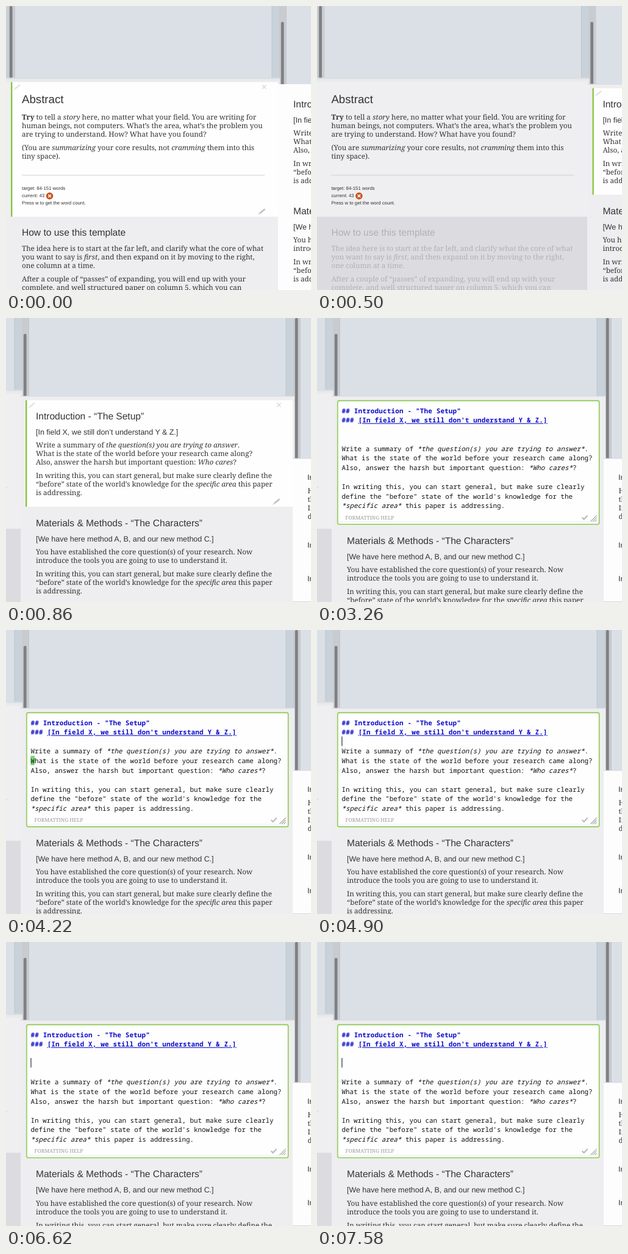
Animation of 500 by 465 pixels, one loop 8000 ms. Source, as an HTML page:

```html
<!DOCTYPE html>
<html lang="en">
<head>
<meta charset="utf-8">
<title>Column editor</title>
<style>
  html, body { margin: 0; width: 100%; height: 100%; overflow: hidden; background: #dbe0e7; }
  svg { display: block; width: 500px; height: 465px; }
  text { white-space: pre; text-rendering: geometricPrecision; }
  .h1, .h2, .h3, .small { font-family: "Liberation Sans", Arial, sans-serif; }
  .h1 { font-size: 18.67px; }
  .h2 { font-size: 15.56px; }
  .h3 { font-size: 12.44px; }
  .small { font-size: 7.78px; }
  .body, .help { font-family: "Noto Serif", serif; }
  .body { font-size: 11.67px; }
  .help { font-size: 8.4px; fill: #999; }
  .code { font-family: "Noto Sans Mono", monospace; font-size: 10.89px; fill: #111; }
  .title { font-weight: bold; fill: #0c0cc8; letter-spacing: .22px; }
  .i { font-style: italic; }
  .b { font-weight: bold; }
  .u { text-decoration: underline; }
</style>
</head>
<body>
<svg id="stage" viewBox="0 0 500 465" xmlns="http://www.w3.org/2000/svg"></svg>
<script>
const LOOP = 8000;
const LINE = 14;      // rendered text
const ROW = 15.56;    // editor text
const PITCH = 445;    // distance between columns
const SCROLL = 422;

const rect = (x, y, w, h, fill, more = '') =>
  `<rect x="${x}" y="${y}" width="${w}" height="${h}" fill="${fill}" ${more}/>`;

const path = (d, stroke, width, more = '') =>
  `<path d="${d}" fill="none" stroke="${stroke}" stroke-width="${width}" ${more}/>`;

const group = (id, ...parts) => `<g id="${id}">${parts.join('')}</g>`;

// _italic_, ~bold~, |underlined|
const mark = s => s
  .replace(/&/g, '&amp;')
  .replace(/_(.+?)_/g, '<tspan class="i">$1</tspan>')
  .replace(/~(.+?)~/g, '<tspan class="b">$1</tspan>')
  .replace(/\|(.+?)\|/g, '<tspan class="u">$1</tspan>');

const text = (cls, x, y, s) => `<text class="${cls}" x="${x}" y="${y}">${mark(s)}</text>`;
const lines = (cls, x, y, step, list) =>
  list.map((s, i) => text(cls, x, y + i * step, s)).join('');

const pencil = (x, y, color) => `<g transform="translate(${x} ${y})">` +
  path('M-3.4 2.8 5 -4', color, 2.4) + path('M-5.8 4.7 -3.6 2.9', color, 1.2) + '</g>';
const cross = (x, y, r, color, w) =>
  path(`M${x - r} ${y - r}l${2 * r} ${2 * r}m0 ${-2 * r}l${-2 * r} ${2 * r}`, color, w);

function backdrop(k, thumbTop, thumbEnd) {
  return `<g transform="translate(${k * PITCH} 0)">` +
    rect(26, 0, 11.5, 465, '#c9cbce') +
    rect(28.8, thumbTop, 4.8, thumbEnd - thumbTop, '#7f8083', 'rx="2.2"') +
    rect(37, 0, 422, 465, '#dbe0e7') + rect(37, 0, 1, 465, '#c3c9d2') +
    rect(459, 0, 13, 465, '#c9d2da') + rect(458.5, 0, 1, 465, '#bcc4ce') + '</g>';
}

function selected(x, y, h) {
  return rect(x, y, 438, h, '#fefefe') + rect(x, y, 2.4, h, '#8bc53f') +
    pencil(x + 10, y + 8.5, '#e3e3e3') + cross(x + 415.3, y + 8, 3.2, '#d8d8d8', 1.3) +
    pencil(x + 411.5, y + h - 8.5, '#bdbdbd');
}

const columnOne = `<g transform="translate(${-SCROLL} 0)">` +
  rect(0, 118, 449, 347, '#e9eaec') + rect(0, 117.5, 449, 2, '#dcdee2') +
  rect(0, 124, 446, 221, '#efeff1') +
  group('parts', rect(0, 345, 446, 120, 'inherit')) +
  group('abstract', selected(8, 124.5, 220.5)) +
  text('h1', 26, 159.2, 'Abstract') +
  lines('body', 26, 186, LINE, [
    '~Try~ to tell a _story_ here, no matter what your field. You are writing for',
    'human beings, not computers. What’s the area, what’s the problem you',
    'are trying to understand. How? What have you found?']) +
  lines('body', 26, 235.5, LINE, [
    '(You are _summarizing_ your core results, not _cramming_ them into this',
    'tiny space).']) +
  rect(26, 276.5, 398, 1, '#cfcfd2') +
  lines('small', 26, 301, 12.1, [
    'target: 84-151 words', 'current: 43', 'Press w to get the word count.']) +
  '<circle cx="71.5" cy="311" r="5.8" fill="#c9521f"/>' + cross(71.5, 311, 2.3, '#fff', 1.6) +
  group('howto',
    text('h2', 26, 376.4, 'How to use this template'),
    lines('body', 26, 400.5, LINE, [
      'The idea here is to start at the far left, and clarify what the core of what',
      'you want to say is _first_, and then expand on it by moving to the right,',
      'one column at a time.']),
    lines('body', 26, 450.5, LINE, [
      'After a couple of “passes” of expanding, you will end up with your',
      'complete, and well structured paper on column 5, which you can'])) +
  '</g>';

const closing = [
  'In writing this, you can start general, but make sure clearly define the',
  '“before” state of the world’s knowledge for the _specific area_ this paper',
  'is addressing.'];

const intro = group('intro',
  text('h2', 49, 165.7, 'Introduction - “The Setup”'),
  text('h3', 49, 190.7, '[In field X, we still don’t understand Y & Z.]'),
  lines('body', 49, 212.3, LINE, [
    'Write a summary of _the question(s) you are trying to answer_.',
    'What is the state of the world before your research came along?',
    'Also, answer the harsh but important question: _Who cares_?']),
  lines('body', 49, 262.3, LINE, closing));

const methods = group('methods',
  text('h2', 49, 340.8, 'Materials & Methods - “The Characters”'),
  text('h3', 49, 365.7, '[We have here method A, B, and our new method C.]'),
  lines('body', 49, 387, LINE, [
    'You have established the core question(s) of your research. Now',
    'introduce the tools you are going to use to understand it.']),
  lines('body', 49, 423, LINE, closing));

const editor = group('editor',
  '<rect id="glow" x="34" y="135.5" width="428.5" height="186.5" rx="2.5" fill="none" stroke="#cfe6b4" stroke-width="3"/>',
  '<rect id="box" x="34" y="135.5" width="428.5" height="186.5" rx="2.5" fill="#fefefe" stroke="#8bc653" stroke-width="1.3"/>',
  lines('code title', 40.5, 155.7, ROW, [
    '## Introduction - "The Setup"',
    '### |[In field X, we still don\'t understand Y & Z.]|']),
  group('block', rect(40.3, 206, 6.6, 15.2, '#6fdc70')),
  group('rest',
    lines('code', 40.5, 155.7 + 3 * ROW, ROW, [
      'Write a summary of _*the question(s) you are trying to answer*_.',
      'What is the state of the world before your research came along?',
      'Also, answer the harsh but important question: _*Who cares*_?',
      '',
      'In writing this, you can start general, but make sure clearly',
      'define the "before" state of the world\'s knowledge for the',
      '_*specific area*_ this paper is addressing.']),
    rect(36, 317.5, 425, 1, '#eeeeee'),
    text('help', 46.5, 314.3, 'FORMATTING HELP'),
    path('M434.6 311l3 3 6 -6.4', '#bcbcbc', 2.2),
    path('M448.5 317.5l10 -10M452 317.5l6.5 -6.5M455.5 317.5l3 -3', '#a5a5a5', 1.1)),
  group('caret', rect(0, 0, 1.1, 15.5, '#222')));

const columnTwo =
  rect(24, 128, 449, 337, '#fdfdfe') +
  group('active', rect(24, 128, 449, 337, '#eeeef0'), rect(24, 127.5, 449, 1, '#d5d8dd')) +
  group('card', selected(32, 134.5, 174.5)) +
  intro + methods + editor;

const columnThree =
  rect(470, 230, 449, 234, '#fdfdfe') + rect(470, 229.5, 449, 1, '#d3d6db') +
  rect(470, 464, 449, 1, '#d3d6db') +
  text('h3', 494, 264.8, 'Introduction') +
  lines('body', 494.5, 286.5, LINE, ['Here', 'the', 'In', 'do']) +
  text('h3', 494, 375.8, 'Introduction') + text('h3', 494, 430.8, 'Introduction');

document.getElementById('stage').innerHTML =
  `<g id="world" fill="#333">` +
  backdrop(-2, 0, 118) + backdrop(-1, 0, 118) + backdrop(0, 26, 140) + backdrop(1, 0, 240) +
  columnOne + columnTwo + columnThree + '</g>';

// Each step [time, value] holds until the next one.
function play(id, prop, steps) {
  const all = [...steps, [LOOP, steps[steps.length - 1][1]]];
  document.getElementById(id).animate(
    all.map(([t, v]) => ({ offset: t / LOOP, [prop]: v, easing: 'step-end' })),
    { duration: LOOP, iterations: Infinity });
}
const during = (id, from, to = LOOP) => play(id, 'visibility', [
  ...(from ? [[0, 'hidden']] : []), [from, 'visible'], ...(to < LOOP ? [[to, 'hidden']] : [])]);
const move = (x, y) => `translate(${x}px, ${y}px)`;
const swing = p => .5 - .5 * Math.cos(Math.PI * p);

const pans = [[0, 0], [500, .05], [620, .26], [700, .507], [780, .753], [860, 1]];
play('world', 'transform', pans.map(([t, p]) => [t, move(SCROLL * (1 - swing(p)), 0)]));

during('abstract', 0, 500);
play('parts', 'fill', [[0, '#eeeef0'], [500, '#dcdce0']]);
play('howto', 'fill', [[0, '#333'], [500, '#b0b0b4']]);
during('active', 500);
during('card', 500, 3260);
during('intro', 0, 3260);
during('editor', 3260);
during('block', 4220, 4700);

const EDIT = 3260;
const extraRows = [[0, 1], [EDIT, 1], [4220, 0], [6140, 1], [6620, 2]];
play('rest', 'transform', extraRows.map(([t, n]) => [t, move(0, n * ROW)]));
play('methods', 'transform',
  extraRows.map(([t, n]) => [t, move(0, t < EDIT ? 0 : 13.4 + n * ROW)]));
for (const id of ['box', 'glow'])
  play(id, 'height', extraRows.map(([t, n]) => [t, `${186.5 + n * ROW}px`]));

const off = move(-999, 0);
const at = (row, x = 40.4) => move(x, 143.3 + row * ROW);
play('caret', 'transform', [
  [0, off], [4700, at(3)], [4900, at(2)], [5380, off], [5580, at(1)], [5860, at(1, 378.2)],
  [6140, at(2)], [6620, at(3)], [7100, off], [7580, at(3)]]);
</script>
</body>
</html>
```
